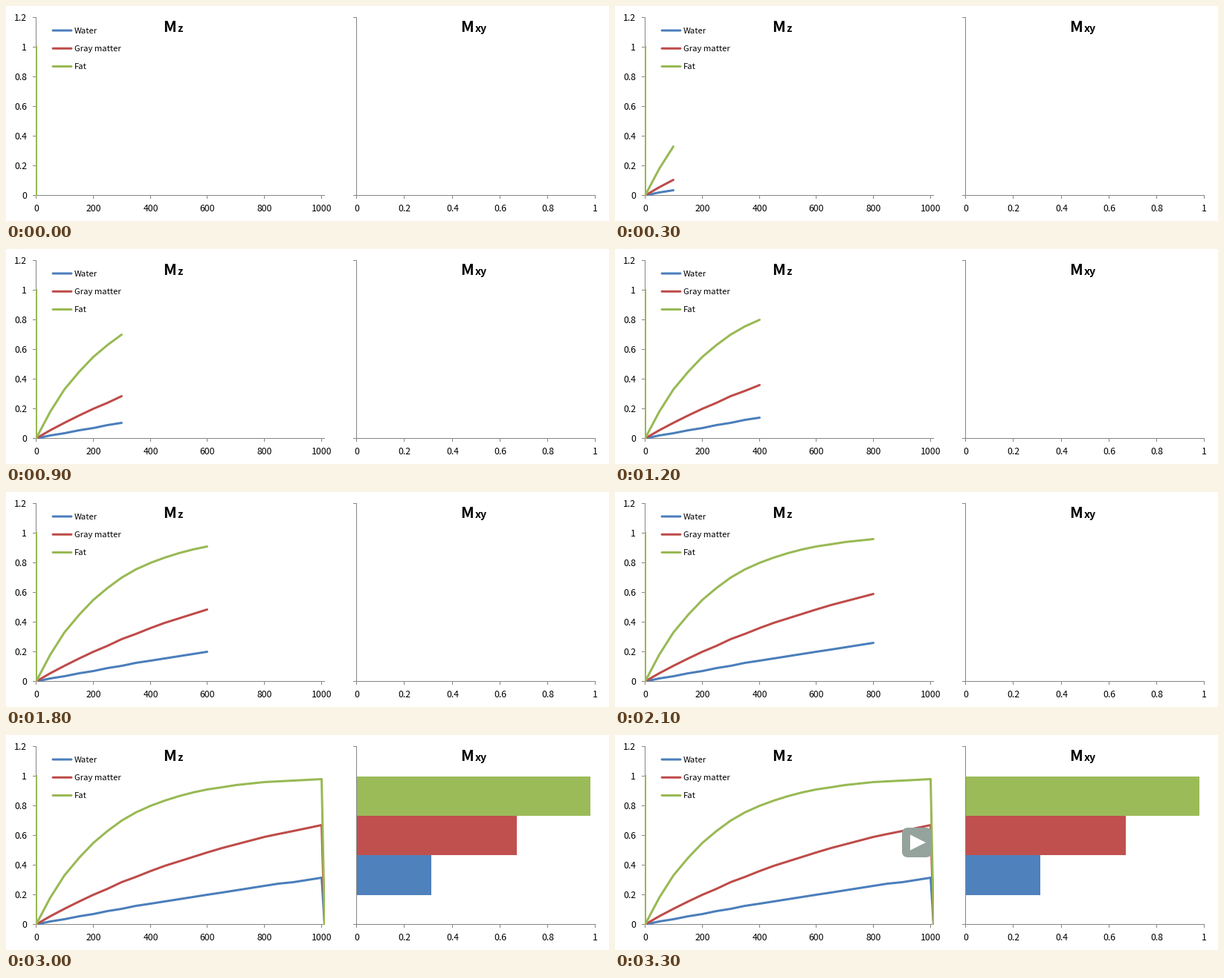
Animation, 811 px wide and 290 px high, one loop 3.6 s. Source, as a matplotlib script:

```python
import numpy as np
import matplotlib.pyplot as plt
from matplotlib.animation import FuncAnimation
from matplotlib.patches import FancyBboxPatch, Polygon, Rectangle

W, H, DPI = 811, 290, 72          # at 72 dpi one point is one pixel
AXIS = "#868686"
FONT = "Noto Sans CJK JP"

# name, T1 in ms, line colour, bar colour
TISSUES = [
    ("Water", 2650, "#4A7EBB", "#4F81BD"),
    ("Gray matter", 900, "#BE4B48", "#C0504D"),
    ("Fat", 250, "#98B954", "#9BBB59"),
]
STEP, T_PULSE, T_END = 50, 1000, 1010
STOPS = [0, 100, 200, 300, 400, 500, 600, 800, 900, 1000, T_END, T_END]

X0, Y0 = 40.5, 255.62             # left chart's zero point
BX0, BAR_UNIT = 471.5, 321.3      # right chart's zero and scale
BAR_BASE, BAR_H = 215.6, 240 / 4.5

fig = plt.figure(figsize=((W + 1e-6) / DPI, (H + 1e-6) / DPI), dpi=DPI,
                 facecolor="white")
ax = fig.add_axes([0, 0, 1, 1])
ax.set(xlim=(0, W), ylim=(H, 0))
ax.axis("off")


def mid(v):
    """Centre of the pixel that holds v."""
    return np.floor(v) + 0.5


def sx(t):
    return mid(X0 + 0.384 * np.asarray(t))


def sy(m):
    return mid(Y0 - 200 * np.asarray(m))


def recovery(t, t1):
    return 1 - np.exp(-np.asarray(t) / t1)


def rule(x1, y1, x2, y2):
    ax.plot([x1, x2], [y1, y2], color=AXIS, lw=1, zorder=2.5,
            solid_capstyle="butt", snap=False)


def label(x, y, s, size=12.2, ha="center", **kw):
    ax.text(x, y, s, fontsize=size, ha=ha, va="baseline", color="black",
            family=FONT, **kw)


def title(x, sub):
    label(x, 34.5, "M", 20.8, "left", weight="bold")
    label(x + 19.5, 35, sub, 14.2, "left", weight="bold")


def draw_axes():
    base = mid(Y0)
    rule(X0, 15, X0, 256)
    rule(36, base, 429, base)
    for k in range(7):
        y = base - 40 * k
        rule(36, y, X0, y)
        label(28, y + 4.5, f"{k / 5:g}", ha="right")
    rule(BX0, 15, BX0, 256)
    rule(467, base, 793, base)
    rule(467, 15.5, BX0, 15.5)
    for k in range(6):
        for x, s in ((sx(200 * k), str(200 * k)),
                     (mid(BX0 + BAR_UNIT * k / 5), f"{k / 5:g}")):
            rule(x, base, x, 260)
            label(x, 277, s)


def path(t1, stop):
    """Full magnetisation, first pulse, recovery, then the second pulse."""
    t = np.arange(0, min(stop, T_PULSE) + 1, STEP)
    m = recovery(t, t1)
    t, m = np.r_[0, t], np.r_[1, m]
    if stop > T_PULSE:
        t, m = np.r_[t, T_END], np.r_[m, 0]
    return sx(t), sy(m)


draw_axes()
title(211, "z")
title(611.5, "xy")

plot_area = Rectangle((40, 15), 389, 241, transform=ax.transData)
curves, bars = [], []
for i, (name, t1, line_col, bar_col) in enumerate(TISSUES):
    style = dict(color=line_col, lw=3, snap=False, zorder=3 + 0.1 * i,
                 solid_capstyle="round", solid_joinstyle="round")
    y = 33 + 24.25 * i
    ax.plot([63, 88], [y, y], **style)
    label(91.5, 37.3 + 24 * i, name, 11.3, "left")

    curve, = ax.plot([], [], **style)
    curve.set_clip_path(plot_area)
    curves.append(curve)

    bar = Rectangle((BX0 - 0.5, BAR_BASE - BAR_H * (i + 1)),
                    BAR_UNIT * recovery(T_PULSE, t1), BAR_H,
                    fc=bar_col, lw=0, zorder=2)
    bars.append(ax.add_patch(bar))

button = [
    FancyBboxPatch((386, 125), 40, 40, fc="#95A39D", ec="none", zorder=5,
                   boxstyle="round,pad=0,rounding_size=8"),
    Polygon([(397, 134.5), (418, 145), (397, 155.5)], fc="white",
            ec="none", zorder=6),
]
for part in button:
    ax.add_patch(part)


def update(i):
    for curve, (_, t1, *_) in zip(curves, TISSUES):
        curve.set_data(*path(t1, STOPS[i]))
    for bar in bars:
        bar.set_visible(STOPS[i] > T_PULSE)
    for part in button:
        part.set_visible(i == len(STOPS) - 1)
    return curves + bars + button


anim = FuncAnimation(fig, update, frames=len(STOPS), interval=300,
                     init_func=lambda: update(0), repeat=True,
                     repeat_delay=0, blit=False)
plt.show()
```
